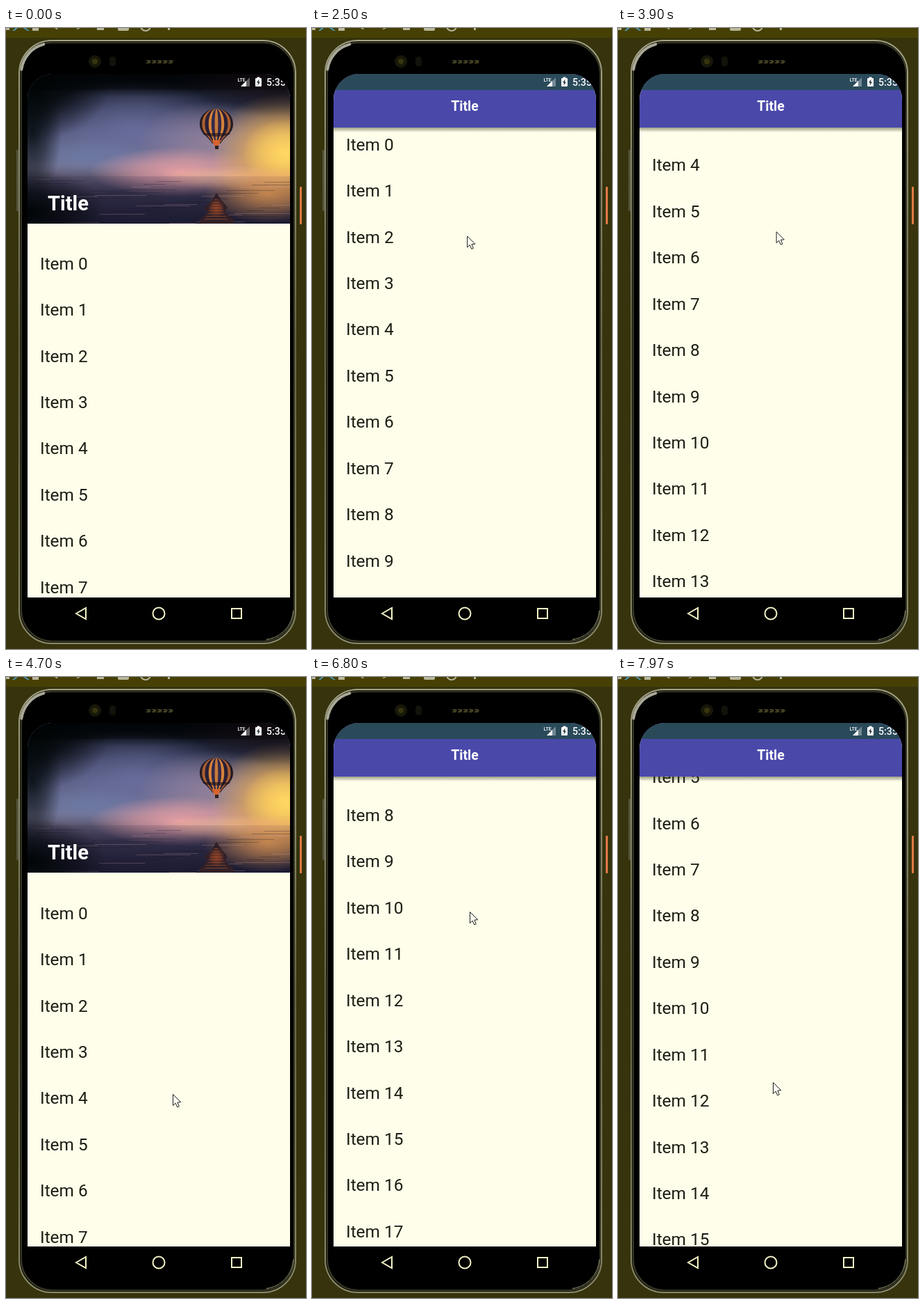
An HTML page with a canvas for the animation above (8000 ms loop, 432 by 892 pixels).

```html
<!DOCTYPE html>
<html lang="en">
<head>
<meta charset="utf-8">
<title>Collapsing header</title>
<style>
  html, body { margin: 0; width: 100%; height: 100%; overflow: hidden; background: #36330d; }
  canvas { display: block; }
</style>
</head>
<body>
<canvas id="stage" width="432" height="892"></canvas>
<script>
const ctx = document.getElementById('stage').getContext('2d');
const LOOP = 8000;
const SCREEN = { left: 31, right: 409, top: 66, bottom: 818 };
const EXPANDED = 281, COLLAPSED = 143, RANGE = EXPANDED - COLLAPSED;
const ROW = 66.43, WIDTH = SCREEN.right - SCREEN.left;

// [time, scroll offset]
const scrollAt = curve([
  [0, 0], [1830, 0], [2000, 15], [2400, 128], [2700, 260], [3130, 366], [3500, 396], [4030, 408],
  [4230, 408], [4430, 240], [4640, -1], [5100, -1], [5900, 0], [5970, 40], [6030, 140], [6070, 260],
  [6200, 425], [6450, 575], [6800, 671], [7250, 733], [7570, 745], [7970, 526.7]
]);
// [time, x, y]
const pointer = [
  [800, 40, 526], [1470, 195, 424], [1830, 195, 424], [2000, 204, 383], [2400, 222, 300],
  [3130, 227, 294], [4230, 228, 292], [4640, 240, 599], [5100, 240, 599], [5880, 236, 606],
  [6070, 229, 354], [6250, 227, 337], [7560, 227, 337], [7970, 223, 582]
];
const pointerX = curve(pointer.map(([t, x]) => [t, x]));
const pointerY = curve(pointer.map(([t, , y]) => [t, y]));

const clamp = (v, lo = 0, hi = 1) => Math.min(hi, Math.max(lo, v));

// Smooth curve through the points that never overshoots them.
function curve(points) {
  const slope = i => (points[i + 1][1] - points[i][1]) / (points[i + 1][0] - points[i][0]);
  const tangents = points.map((p, i) => {
    if (i === 0 || i === points.length - 1) return 0;
    const a = slope(i - 1), b = slope(i);
    return a * b > 0 ? 2 * a * b / (a + b) : 0;
  });
  return t => {
    const next = points.findIndex(p => p[0] > t);
    if (next === 0) return points[0][1];
    if (next < 0) return points[points.length - 1][1];
    const i = next - 1, [t0, v0] = points[i], [t1, v1] = points[next];
    const d = t1 - t0, u = (t - t0) / d, w = 1 - u;
    return v0 * w * w * (1 + 2 * u) + v1 * u * u * (3 - 2 * u)
      + d * u * w * (tangents[i] * w - tangents[next] * u);
  };
}

function rect(x, y, w, h, color) {
  ctx.fillStyle = color;
  ctx.fillRect(x, y, w, h);
}

function round(x, y, w, h, r, fill, stroke, lineWidth = 1) {
  ctx.beginPath();
  ctx.roundRect(x, y, w, h, r);
  paint(fill, stroke, lineWidth);
}

function poly(points, fill, stroke, lineWidth = 1) {
  ctx.beginPath();
  points.forEach(([x, y]) => ctx.lineTo(x, y));
  ctx.closePath();
  paint(fill, stroke, lineWidth);
}

function circle(x, y, r, fill, stroke, lineWidth) {
  ctx.beginPath();
  ctx.arc(x, y, r, 0, 7);
  paint(fill, stroke, lineWidth);
}

function paint(fill, stroke, lineWidth) {
  if (fill) { ctx.fillStyle = fill; ctx.fill(); }
  if (stroke) { ctx.strokeStyle = stroke; ctx.lineWidth = lineWidth; ctx.stroke(); }
}

function text(str, x, y, size, color, weight = 400, align = 'left') {
  ctx.font = `${weight} ${size}px Roboto, sans-serif`;
  ctx.textAlign = align;
  ctx.fillStyle = color;
  ctx.fillText(str, x, y);
}

function vertical(y0, y1, ...colors) {
  const g = ctx.createLinearGradient(0, y0, 0, y1);
  colors.forEach((c, i) => g.addColorStop(i / (colors.length - 1), c));
  return g;
}

// Soft elliptical blob; rgb is "r,g,b".
function glow(x, y, rx, ry, rgb, alpha) {
  ctx.save();
  ctx.translate(x, y);
  ctx.scale(rx, ry);
  const g = ctx.createRadialGradient(0, 0, 0, 0, 0, 1);
  g.addColorStop(0, `rgba(${rgb},${alpha})`);
  g.addColorStop(.5, `rgba(${rgb},${alpha * .6})`);
  g.addColorStop(1, `rgba(${rgb},0)`);
  rect(-1, -1, 2, 2, g);
  ctx.restore();
}

function drawSurroundings() {
  rect(0, 0, 432, 892, '#36330d');
  rect(0, 0, 432, 14, '#474005');
  const pale = '#b9b79a', blue = '#4d9fc0';
  rect(0, 0, 5, 3, pale);
  poly([[9, 4], [14, 0], [17, 0], [12, 4]], blue);
  poly([[25, 0], [28, 0], [34, 4], [31, 4]], blue);
  rect(38, 0, 9, 4, pale);
  poly([[70, 0], [73, 0], [75, 2], [73, 2]], pale);
  poly([[101, 2], [104, 0], [107, 0], [103, 2]], pale);
  rect(131, 0, 10, 3, pale);
  round(161, -6, 16, 10, 2, pale);
  circle(201, -3, 7, null, pale, 2);
  rect(233, 0, 3, 3, pale);
}

function drawPhone() {
  round(15, 175, 3, 88, 1, '#55543b');
  round(423, 228, 3, 54, 1, '#e07b45');
  round(19, 18, 398, 866, 47, '#15160c', vertical(18, 884, '#a5a587', '#65654a', '#8a8a6b'), 2);
  round(22, 21, 393, 860, 45, '#050603', '#42422c', 1.5);
  ctx.lineCap = 'round';
  ctx.beginPath();
  ctx.arc(65, 65, 43, Math.PI * 1.04, Math.PI * 1.42);
  paint(null, '#aaa998', 4);
  ctx.beginPath();
  ctx.arc(368, 833, 46, .1, 1.4);
  paint(null, '#6c6b51', 2);
  ctx.lineCap = 'butt';
  round(24, 24, 389, 854, 43, '#000');

  circle(128, 48, 9, '#17170a');
  circle(128, 48, 4, '#35340c');
  round(149, 41, 9, 14, 4, '#12120a');
  for (let x = 201; x < 240; x += 8) {
    poly([[x, 46], [x + 6, 46], [x + 8, 48], [x + 6, 51], [x, 51], [x + 3, 48]], '#3f3e22');
  }
  circle(319, 71, 4, '#15150a');
}

function drawNavigation() {
  const color = '#f3f2c7';
  poly([[101, 841], [115, 833], [115, 849]], null, color, 2);
  circle(220, 841, 8.5, null, color, 2);
  ctx.strokeStyle = color;
  ctx.strokeRect(325, 834, 14, 14);
}

function drawBalloon() {
  const cx = 303;
  const gore = (width, color) => {
    ctx.save();
    ctx.translate(cx, 0);
    ctx.scale(width, 1);
    ctx.beginPath();
    ctx.moveTo(-6, 166);
    ctx.bezierCurveTo(-12, 155, -24, 152, -24, 138);
    ctx.bezierCurveTo(-24, 109, 24, 109, 24, 138);
    ctx.bezierCurveTo(24, 152, 12, 155, 6, 166);
    ctx.closePath();
    paint(color);
    ctx.restore();
  };
  gore(1, '#241a22');
  gore(.86, '#a95f32');
  gore(.69, '#2a1f35');
  gore(.47, '#d5843a');
  gore(.3, '#322a4c');
  gore(.1, '#c97939');
  ctx.beginPath();
  ctx.ellipse(cx, 151, 20, 5, 0, 0, Math.PI);
  paint('rgba(25,17,27,.6)');
  poly([[297, 161], [309, 161], [306, 169], [300, 169]], '#d7632d');
  rect(301, 169, 5, 5, '#32201c');
}

function drawLandscape() {
  rect(31, 66, WIDTH, 216, vertical(66, 282, '#06090e', '#252b42', '#585d82', '#77718d', '#302f45', '#141722'));
  glow(185, 145, 140, 70, '112,115,165', .75);
  glow(110, 185, 110, 28, '106,126,172', .65);
  glow(300, 165, 110, 60, '162,137,158', .75);
  glow(250, 207, 130, 36, '242,164,166', .9);
  glow(400, 180, 105, 88, '255,182,72', 1);
  glow(405, 180, 65, 50, '255,222,105', .85);
  glow(330, 215, 110, 18, '255,200,150', .6);

  // Water
  rect(31, 213, WIDTH, 69, vertical(213, 282, 'rgba(55,45,82,.15)', 'rgba(30,28,55,.7)'));
  glow(375, 238, 90, 42, '247,163,83', .65);
  for (let i = 0; i < 46; i++) {
    const x = 40 + (i * 83) % 350, y = 217 + (i * 17) % 64, w = 24 + (i * 29) % 60;
    rect(x, y, w, 1, i % 3 ? 'rgba(20,20,45,.28)' : 'rgba(222,170,170,.24)');
  }
  // Dark corners
  glow(31, 80, 120, 85, '0,4,3', 1);
  glow(31, 265, 115, 62, '0,5,6', 1);
  glow(200, 64, 230, 36, '2,6,10', .95);
  glow(390, 66, 130, 62, '24,14,20', .9);
  glow(38, 150, 42, 100, '0,8,9', .8);

  poly([[303, 237], [310, 247], [319, 258], [315, 264], [329, 276], [325, 284], [280, 284], [278, 276],
    [290, 264], [285, 259], [297, 247]], '#322027');
  for (let i = 0; i < 8; i++) rect(300 - i * 2, 246 + i * 4, 5 + i * 4, 1, '#78432f');
  glow(303, 259, 12, 14, '176,77,38', .65);
  drawBalloon();
}

function drawList(scroll) {
  rect(31, 66, WIDTH, 752, '#fefeea');
  for (let i = 0; i < 26; i++) {
    const y = 338 - scroll + i * ROW;
    if (y > 40 && y < 850) text(`Item ${i}`, 49, y + 8.7, 24.4, '#1d1d12');
  }
}

function drawHeader(scroll, pinned) {
  const progress = clamp(scroll / RANGE);
  const bottom = EXPANDED - RANGE * progress;
  const fade = clamp((progress - .61) / .39);

  if (pinned) rect(31, bottom, WIDTH, 7, vertical(bottom, bottom + 7, 'rgba(60,60,35,.5)', 'rgba(60,60,35,0)'));
  ctx.save();
  ctx.beginPath();
  ctx.rect(31, 66, WIDTH, bottom - 66);
  ctx.clip();
  rect(31, 66, WIDTH, 216, '#4a49aa');
  if (fade < 1) {
    ctx.globalAlpha = 1 - fade;
    ctx.translate(0, -RANGE * progress / 4);
    drawLandscape();
  }
  ctx.restore();

  rect(31, 66, WIDTH, 23, 'rgba(0,0,0,.3)');
  ctx.globalAlpha = fade;
  rect(31, 66, WIDTH, 23, '#2a4a5a');
  ctx.globalAlpha = 1;

  if (pinned) text('Title', 220, 119, 19.4, '#fff', 700, 'center');
  else text('Title', 60 - progress, bottom - 19.5 + 12.5 * progress, 19.4 * (1.5 - .5 * progress), '#fff', 700);
}

function drawStatus() {
  poly([[351, 71], [351, 84], [338, 84]], 'rgba(255,255,255,.35)');
  poly([[346, 76], [346, 84], [338, 84]], '#fff');
  text('LTE', 333.5, 77, 7, '#fff', 500);
  round(359, 72, 9, 12, 1, '#fff');
  rect(361.5, 70.5, 4, 2, '#fff');
  poly([[364.5, 73.5], [361, 78.5], [363, 78.5], [362.5, 82.5], [366, 77.5], [364, 77.5]], '#20303a');
  text('5:35', 375, 83, 14, '#fff', 500);
}

function drawPointer(x, y) {
  ctx.save();
  ctx.translate(x + .5, y + .5);
  poly([[0, 0], [0, 16], [3.6, 12.6], [6.2, 18.4], [8.8, 17.2], [6.3, 11.6], [11.2, 11.2]], '#fffff2', '#1c1c1c');
  ctx.restore();
}

function draw(t) {
  const scroll = scrollAt(t);
  // The pinned state follows the scroll with a short delay.
  const pinned = scroll >= RANGE && scrollAt(t - 50) > RANGE;
  drawSurroundings();
  drawPhone();
  ctx.save();
  ctx.beginPath();
  ctx.roundRect(SCREEN.left, SCREEN.top, WIDTH, SCREEN.bottom - SCREEN.top, [37, 37, 0, 0]);
  ctx.clip();
  drawList(scroll);
  drawHeader(scroll, pinned);
  drawStatus();
  ctx.restore();
  drawNavigation();
  if (t >= 800) drawPointer(pointerX(t), pointerY(t));
}

const start = performance.now();
function frame() {
  draw((performance.now() - start) % LOOP);
  requestAnimationFrame(frame);
}
frame();
</script>
</body>
</html>
```
